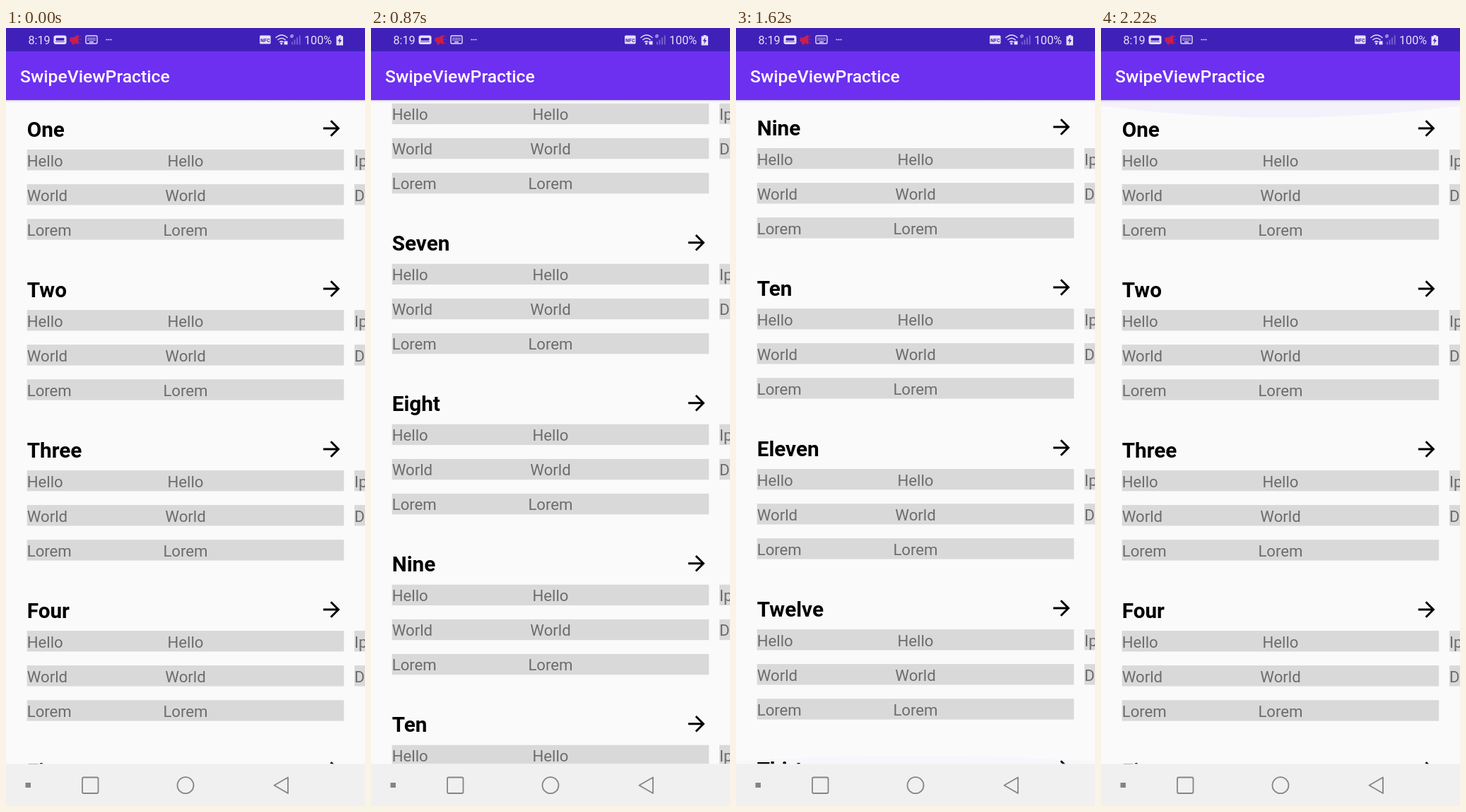
An HTML page for the animation above (2250 ms loop, 508 by 1101 pixels).

```html
<!DOCTYPE html>
<html lang="en">
<head>
<meta charset="utf-8">
<title>SwipeViewPractice</title>
<style>
html, body { margin: 0; width: 100%; height: 100%; overflow: hidden; background: #fafafa; }
svg { display: block; width: 100vw; height: 100vh; font-family: Roboto, sans-serif; }
.title { font-weight: 700; font-size: 29.7px; }
.row { font-size: 22.2px; fill: #6c6c6c; }
.mid { text-anchor: middle; }
.bar { fill: #d9d9d9; }
.line { fill: none; stroke: #858585; stroke-width: 1.8; }
</style>
</head>
<body>
<svg viewBox="0 0 508 1101">
  <defs>
    <clipPath id="view"><rect y="102" width="508" height="939.5"/></clipPath>
    <linearGradient id="shade" x2="0" y2="1">
      <stop stop-opacity=".16"/><stop offset="1" stop-opacity="0"/>
    </linearGradient>
  </defs>
  <rect width="508" height="1101" fill="#fafafa"/>
  <g clip-path="url(#view)">
    <g id="list"></g>
    <g fill="#6f30f0">
      <circle id="topGlow" cx="254" cy="-527.9" r="609.6"/>
      <circle id="endGlow" cx="254" cy="-527.9" r="609.6"/>
    </g>
    <rect y="102" width="508" height="3" fill="url(#shade)"/>
  </g>

  <rect width="508" height="33" fill="#3f21b9"/>
  <rect y="33" width="508" height="69" fill="#6e30f0"/>
  <text x="20" y="77" font-size="24.7" font-weight="500" fill="#fff">SwipeViewPractice</text>

  <g id="status" fill="#e6e0f6" font-size="16.2">
    <text x="31.5" y="23">8:19</text>
    <rect x="67.500" y="10.500" width="18" height="12.500" rx="3"/>
    <path d="M71 14.500h11v3h-11zM70 19.500h13" fill="#3f21b9" stroke="#3f21b9" stroke-width=".8"/>
    <path d="M91 14h4l7-4v13l-7-4h-4zM93 19h3l1 4h-3zM103 13l3-2M103.500 16.500h3M103 20l3 2" fill="#c81f4e" stroke="#c81f4e"/>
    <rect x="113" y="11" width="16" height="11" rx="1.500" fill="none" stroke="#e6e0f6" stroke-width="1.400"/>
    <path d="M115.500 14.500h11M115.500 17h11" stroke="#e6e0f6" stroke-width="1.400" stroke-dasharray="1.500 .9"/>
    <path d="M118 19.700h6M141.500 16.500h8" stroke="#e6e0f6" stroke-width="1.400"/>
    <path d="M144 15v3M147 15v3" stroke="#3f21b9"/>
    <rect x="359" y="10.500" width="15.500" height="12" rx="1.500"/>
    <text x="366.800" y="19.500" class="mid" font-size="7" font-weight="700" fill="#3f21b9">NFC</text>
    <g fill="none" stroke="#e6e0f6" stroke-width="1.500">
      <path d="M381.500 14q8.500-8 17 0M384.300 17q5.700-5 11.400 0M387 20q2.700-2.300 5.400 0"/>
      <circle cx="404.500" cy="11.500" r="1.800" stroke-width="1"/>
      <path d="M403 13.500l3-4" stroke-width=".8"/>
    </g>
    <circle cx="389.700" cy="22" r="1.600"/>
    <path d="M393.500 18.500h5v5h-5z"/>
    <path d="M405 23.500v-4M408.500 23.500v-7M412 23.500v-10M415.700 23.500v-13" stroke="#e6e0f6" stroke-width="1.800" opacity=".35"/>
    <text x="422" y="23">100%</text>
    <path d="M470.500 10h4v1.500h2.500v13h-9.500v-13h3z"/>
    <path d="M473.500 13l-4 5.500h2.500l-1 4.500 4-6h-2.500z" fill="#3f21b9"/>
  </g>

  <rect y="1041.500" width="508" height="59.500" fill="#f0f0f0"/>
  <rect x="27.500" y="1068" width="7.500" height="7" fill="#858585"/>
  <rect class="line" x="108" y="1060.500" width="22.500" height="22.500" rx="2"/>
  <circle class="line" cx="254" cy="1071.700" r="11.500"/>
  <path class="line" stroke-linejoin="round" d="M379.500 1071.700L399 1060.500v22.500z"/>
</svg>
<script>
const LOOP = 2250, STEP = 30, END = 2692, PITCH = 227;
const TOP = 102, BOTTOM = 1041.5;
const names = "One Two Three Four Five Six Seven Eight Nine Ten Eleven Twelve Thirteen Fourteen Fifteen Sixteen".split(" ");
const rows = [["Hello", "Ipsum"], ["World", "Dolor"], ["Lorem"]];
const byId = id => document.getElementById(id);

function rowMarkup([word, next], i) {
  const y = 172 + i * 49.1, base = y + 23.5;
  return `<rect class="bar" x="29.7" y="${y}" width="448.500" height="29.400"/>
    <text class="row" x="29.700" y="${base}">${word}</text>
    <text class="row mid" x="254" y="${base}">${word}</text>` +
    (next ? `<rect class="bar" x="493" y="${y}" width="449" height="29.400"/>
    <text class="row" x="493" y="${base}">${next}</text>` : "");
}

byId("list").innerHTML = names.map((name, i) => `<g transform="translate(0 ${i * PITCH})">
  <text class="title" x="29.700" y="153.700">${name}</text>
  <path transform="translate(443.1 124.400) scale(1.470)" d="M12 4l-1.410 1.410L16.170 11H4v2h12.170l-5.580 5.590L12 20l8-8z"/>
  ${rows.map(rowMarkup).join("")}</g>`).join("");

// Two flings: down to the end of the list, then back to the top.
function scrollAt(t) {
  if (t < 720) return 0;
  if (t < 1530) {
    const u = t - 720;
    return u > 368 ? END : Math.min(END, 84.3 + 7.68 * u - 0.0016 * u * u);
  }
  const keys = [[1530, 2607], [1560, 2390], [1620, 1818], [1797, 0], [LOOP, 0]];
  const k = keys.findIndex(([at]) => t < at);
  const [t0, a] = keys[k - 1], [t1, b] = keys[k];
  return a + (b - a) * (t - t0) / (t1 - t0);
}

// Edge glow: grows quickly on impact, then recedes with a decelerating curve.
function drawGlow(node, age, place) {
  const grow = 170, fade = 575;
  let size = 0, alpha = 0;
  if (age > 0 && age < grow) {
    size = 1 - (1 - age / grow) ** 2;
    alpha = 0.09 + 0.06 * size;
  } else if (age >= grow && age < grow + fade) {
    size = (1 - (age - grow) / fade) ** 2;
    alpha = 0.15 * size;
  }
  node.setAttribute("transform", place(size));
  node.setAttribute("opacity", alpha);
}

function draw(now) {
  const t = Math.floor(now % LOOP / STEP) * STEP;
  byId("list").setAttribute("transform", `translate(0 ${-scrollAt(t)})`);
  drawGlow(byId("topGlow"), t - 1790, s => `translate(0 ${TOP}) scale(1 ${s})`);
  drawGlow(byId("endGlow"), t - 1089, s => `translate(0 ${BOTTOM}) scale(1 ${-s})`);
}

let start;
function tick(now) {
  start ??= now;
  draw(now - start);
  requestAnimationFrame(tick);
}
draw(0);
requestAnimationFrame(tick);
</script>
</body>
</html>
```
